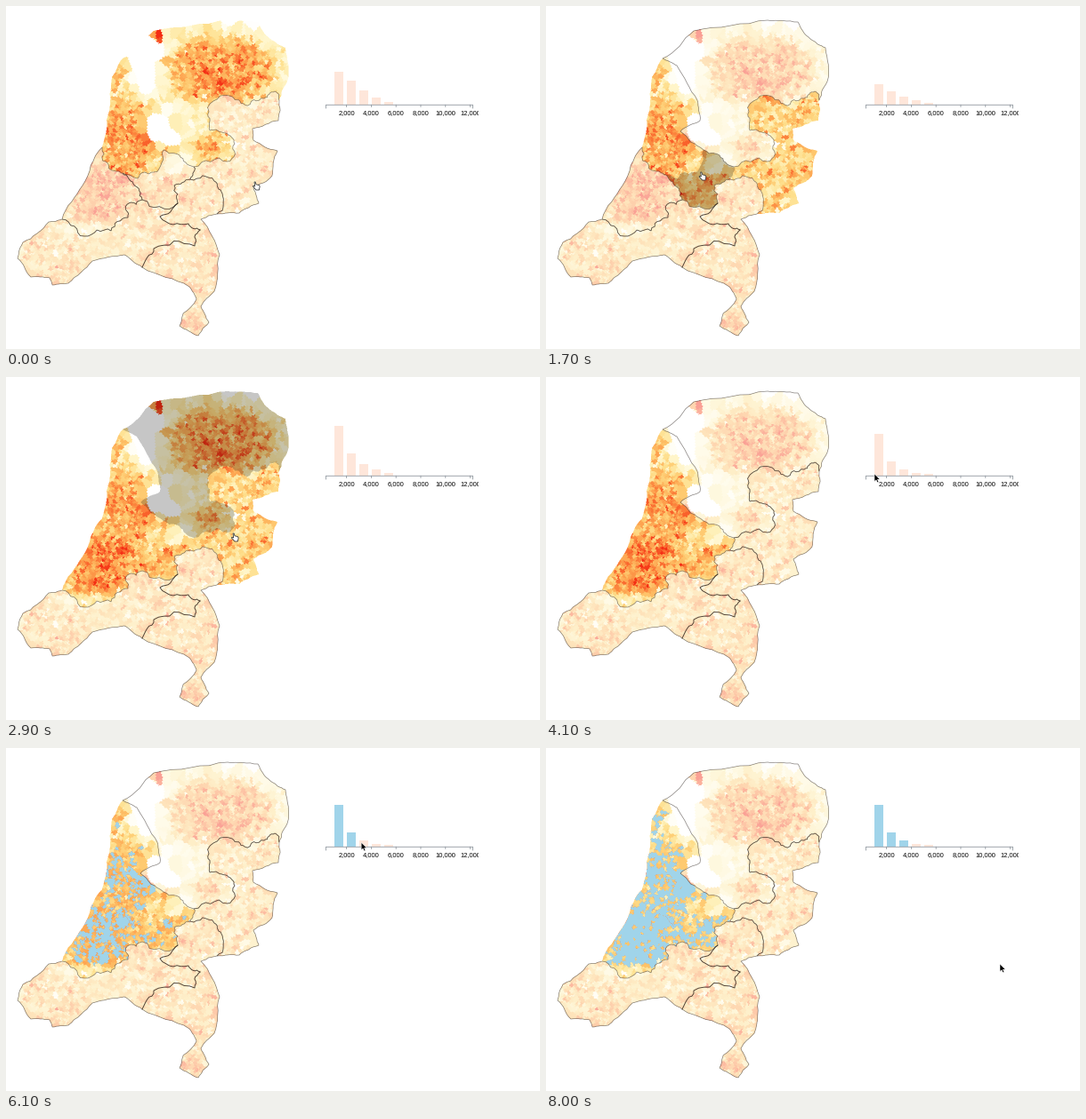
These frames come from a looping animation (600x386 px, 8100 ms). A matplotlib script:

```python
import numpy as np
import matplotlib.pyplot as plt
from matplotlib.animation import FuncAnimation
from matplotlib.patches import Polygon, Rectangle
from matplotlib.path import Path

W, H, MAP_W = 600, 386, 330
FRAMES, INTERVAL = 81, 100
SS = 2  # supersampling of the map
PX = .72  # points per pixel
rng = np.random.default_rng(11)

# Junctions, and the key points of the borders that run between them.
NODES = {"a": (131, 59), "b": (307, 106), "c": (211, 181), "d": (177, 162), "e": (131, 188),
         "f": (108, 159), "g": (63, 240), "h": (153, 218), "i": (207, 195), "j": (237, 234)}
COASTS = {
    "ab": [(166, 28), (249, 16), (283, 18), (297, 37), (314, 47), (316, 85)],
    "bj": [(306, 129), (277, 138), (278, 151), (305, 163), (299, 191), (278, 205), (284, 222),
           (262, 233)],
    "jg": [(219, 240), (240, 280), (234, 321), (219, 338), (228, 356), (216, 371), (195, 360),
           (199, 346), (214, 330), (206, 316), (153, 294), (133, 280), (97, 287), (70, 312),
           (52, 314), (49, 306), (28, 305), (13, 284), (19, 266), (48, 243)],
    "gf": [(86, 202)],
    "fa": [(116, 118), (119, 80)],
    "da": [(151, 141), (173, 129), (170, 106), (147, 67)],
}
BORDERS = {
    "bc": [(302, 96), (290, 104), (268, 111), (254, 102), (228, 119), (229, 140), (247, 143),
           (257, 155), (249, 175)],
    "cd": [(195, 168)],
    "de": [(166, 187), (148, 194)],
    "ef": [(119, 185)],
    "eh": [(143, 200)],
    "hg": [(138, 222), (137, 238), (118, 253), (88, 259)],
    "ih": [(189, 202), (193, 222)],
    "ci": [],
    "ij": [(234, 197), (243, 211)],
}
INNER = [[(193, 222), (173, 237), (205, 245), (218, 252)],
         [(218, 252), (212, 270), (166, 273), (153, 294)]]

# Junction loop, base density, and histogram curve: size, width, power.
REGIONS = {
    "north": ("abcda", .2, (23.5, 2.7, 2)),
    "northwest": ("adefa", .35, (14, 1.2, 1)),
    "centre": ("cdehic", .46, (10, 1.1, 1)),
    "west": ("gfehg", .47, (23, .7, .7)),
    "east": ("cbjic", .38, (9.3, 3.2, 2)),
    "south": ("jghij", .41, (0, 1, 1)),
}
# Wide built-up (positive) or watery (negative) areas: x, y, rx, ry, amount.
AREAS = [(241, 70, 63, 38, .36), (232, 160, 22, 20, .24), (168, 36, 4, 4, .7),
         (158, 64, 24, 40, -.5), (170, 138, 20, 22, -.5), (199, 153, 12, 13, -.5),
         (240, 14, 60, 10, -.3), (133, 152, 30, 45, .2), (101, 212, 30, 27, .16),
         (90, 251, 38, 9, -.2), (192, 178, 16, 14, -.26), (211, 357, 16, 14, .14)]


def roughen(points, amount):
    """Fractal midpoint displacement of a polyline."""
    points = np.array(points, float)
    for _ in range(3):
        step = np.diff(points, axis=0)
        normal = step[:, ::-1] * (1, -1)
        mid = points[:-1] + step / 2 + normal * rng.uniform(-amount, amount, (len(step), 1))
        merged = np.empty((2 * len(points) - 1, 2))
        merged[::2], merged[1::2] = points, mid
        points = merged
    return points


edges = {}
for table, amount in ((COASTS, .07), (BORDERS, .24)):
    for (start, end), inner in table.items():
        line = roughen([NODES[start], *inner, NODES[end]], amount)
        edges[start + end], edges[end + start] = line, line[::-1]
outlines = {k: np.vstack([edges[p + q] for p, q in zip(loop, loop[1:])])
            for k, (loop, _, _) in REGIONS.items()}

gx, gy = np.meshgrid((np.arange(MAP_W * SS) + .5) / SS, (np.arange(H * SS) + .5) / SS)
grid = np.column_stack([gx.ravel(), gy.ravel()])
masks = {k: Path(o).contains_points(grid).reshape(gx.shape) for k, o in outlines.items()}
land = np.any(list(masks.values()), axis=0)
base = np.zeros(gx.shape)
for key, mask in masks.items():
    base[mask] = REGIONS[key][1]


def pick(table, x, y):
    return table[(y * SS).astype(int), (x * SS).astype(int)]


def density(x, y):
    level = pick(base, x, y)
    for cx, cy, rx, ry, amount in AREAS:
        level = level + amount * np.exp(-(((x - cx) / rx) ** 2 + ((y - cy) / ry) ** 2) ** 3)
    towns = np.zeros(len(x))
    for _ in range(280):
        cx, cy = rng.uniform(10, 320), rng.uniform(13, 374)
        r, amount = rng.uniform(2.5, 7), rng.uniform(.1, .3)
        towns = np.maximum(towns, amount * np.exp(-((x - cx) ** 2 + (y - cy) ** 2) / r ** 2))
    return level + towns * np.clip(3 * level - .4, 0, 1)


# Cell centres crowd together where the density is high.
sx, sy = rng.uniform(10, 320, 20000), rng.uniform(13, 374, 20000)
inside = pick(land, sx, sy)
sx, sy = sx[inside], sy[inside]
level = density(sx, sy)
keep = rng.random(len(sx)) < np.clip(1.05 * level - .06, .025, 1)
sx, sy, level = sx[keep], sy[keep], level[keep]
value = np.clip(level + rng.normal(0, 1, len(sx)) * np.clip(.3 * level, .02, .11), 0, 1)


def nearest_cells():
    cells = np.zeros(gx.shape, int)
    seeds_x, seeds_y = sx.astype("f4"), sy.astype("f4")
    warp_x = gx + .6 * np.sin(1.9 * gy + .6 * gx)
    warp_y = gy + .6 * np.sin(1.7 * gx - .8 * gy)
    for top in range(0, H * SS, 16):
        band = slice(top, top + 16)
        here = land[band]
        if not here.any():
            continue
        near = np.flatnonzero(np.abs(sy - (top + 8) / SS) < 28)
        x, y = warp_x[band][here].astype("f4"), warp_y[band][here].astype("f4")
        dist = (x[:, None] - seeds_x[near]) ** 2 + (y[:, None] - seeds_y[near]) ** 2
        cells[band][here] = near[dist.argmin(axis=1)]
    return cells


def shrink(a):
    return a.astype(float).reshape(H, SS, MAP_W, SS, -1).mean(axis=(1, 3))


STOPS = [.04, .12, .25, .38, .5, .62, .74, .9]
COLOURS = np.array([(255, 255, 255), (255, 252, 228), (255, 241, 186), (254, 222, 138),
                    (254, 194, 104), (253, 158, 76), (250, 104, 46), (244, 45, 20)]) / 255
BLUE = np.array([160, 212, 234]) / 255
PALE = "#fee6da"

cell_value = value[nearest_cells()]
rgb = np.stack([np.interp(cell_value, STOPS, c) for c in COLOURS.T], axis=-1)
rgb[~land] = 1
full = shrink(rgb)
cover = {k: shrink(m) for k, m in masks.items()}
brushed = [shrink(land & (cell_value > t)) for t in (.7, .6, .5)]

# Clicks toggle a region, which flashes for two frames and then settles.
CLICKS = [(3, "east", 277, 196), (9, "north", 226, 96), (16, "centre", 187, 182),
          (22, "west", 107, 212), (28, "north", 250, 172), (31, "east", 265, 184),
          (34, "north", 236, 162)]
FLASH = 2
BRUSH = [46, 56, 63]
TRAIL = np.array([(0, 279, 198)] + [(t, x, y) for t, _, x, y in CLICKS]
                 + [(41, 369, 109), (45, 371, 108), (52, 394, 105), (66, 402, 107),
                    (74, 402, 107), (80, 510, 243)])


def selection(frame):
    chosen, flashing = {"north", "northwest"}, set()
    for when, key, _, _ in CLICKS:
        if frame >= when + FLASH:
            chosen ^= {key}
        elif frame >= when:
            flashing.add(key)
    return chosen, flashing


def bar_height(key, i):
    size, width, power = REGIONS[key][2]
    return size * np.exp(-(i / width) ** power)


fig = plt.figure(figsize=(W / 100, H / 100), dpi=100, facecolor="white")
ax = fig.add_axes([0, 0, 1, 1])
ax.axis("off")
image = ax.imshow(full, extent=(0, MAP_W, H, 0), interpolation="nearest", aspect="auto")
ax.set(xlim=(0, W), ylim=(H, 0))

borders = {k: ax.add_patch(Polygon(o, fill=False, ec=(.2, .17, .15, .6), lw=.7 * PX))
           for k, o in outlines.items()}
for points in INNER:
    ax.plot(*roughen(points, .2).T, color=(.15, .1, .08, .85), lw=.9 * PX)

bars = [ax.add_patch(Rectangle((369 + 14 * i, 111), 10, 0, fc=PALE)) for i in range(5)]
axis_style = dict(color="#8a929a", lw=.8 * PX, snap=False)
ax.plot([359.5, 359.5, 524.5, 524.5], [115, 111.3, 111.3, 115], **axis_style)
for i in range(6):
    x = 382.6 + 27.8 * i
    ax.plot([x, x], [111.3, 113.5], **axis_style)
    ax.text(x, 121.9, f"{2000 * (i + 1):,}", ha="center", va="baseline",
            family="Liberation Sans", size=7.5 * PX, color="black")
ax.add_patch(Rectangle((530.5, 112), 20, 14, fc="white", zorder=4))

HAND = np.array([(0, 0), (1.2, 0), (2, 2.8), (5.2, 3.5), (6.2, 5), (5.4, 9), (2, 9),
                 (-1.6, 5), (-1, 4.2), (.7, 5)])
ARROW = np.array([(0, 0), (0, 8.6), (2, 6.8), (3.4, 9.8), (4.8, 9.2), (3.5, 6.3), (6.1, 6.1)])
hand = ax.add_patch(Polygon(HAND, fc="white", ec="#333333", lw=.8 * PX, zorder=6))
arrow = ax.add_patch(Polygon(ARROW, fc="black", ec="white", lw=.5 * PX, zorder=6))


def update(frame):
    chosen, flashing = selection(frame)
    steps = sum(frame >= b for b in BRUSH)
    picture = full.copy()
    for key, mask in cover.items():
        if key in flashing:
            picture *= 1 - .22 * mask
        elif key not in chosen:
            picture += (1 - picture) * .55 * mask
        elif steps:
            picture += (BLUE - picture) * mask * brushed[steps - 1]
        borders[key].set_visible(key not in chosen | flashing)
    image.set_data(np.clip(picture, 0, 1))

    for i, bar in enumerate(bars):
        height = sum(bar_height(k, i) for k in chosen)
        bar.set(y=111 - height, height=height, facecolor=BLUE if i < steps else PALE)

    tip = [np.interp(frame, TRAIL[:, 0], TRAIL[:, i]) for i in (1, 2)]
    on_map = frame < 38
    hand.set(visible=on_map, xy=HAND + tip)
    arrow.set(visible=not on_map, xy=ARROW + tip)
    return []


anim = FuncAnimation(fig, update, frames=FRAMES, interval=INTERVAL, repeat=True, repeat_delay=0)
plt.show()
```
